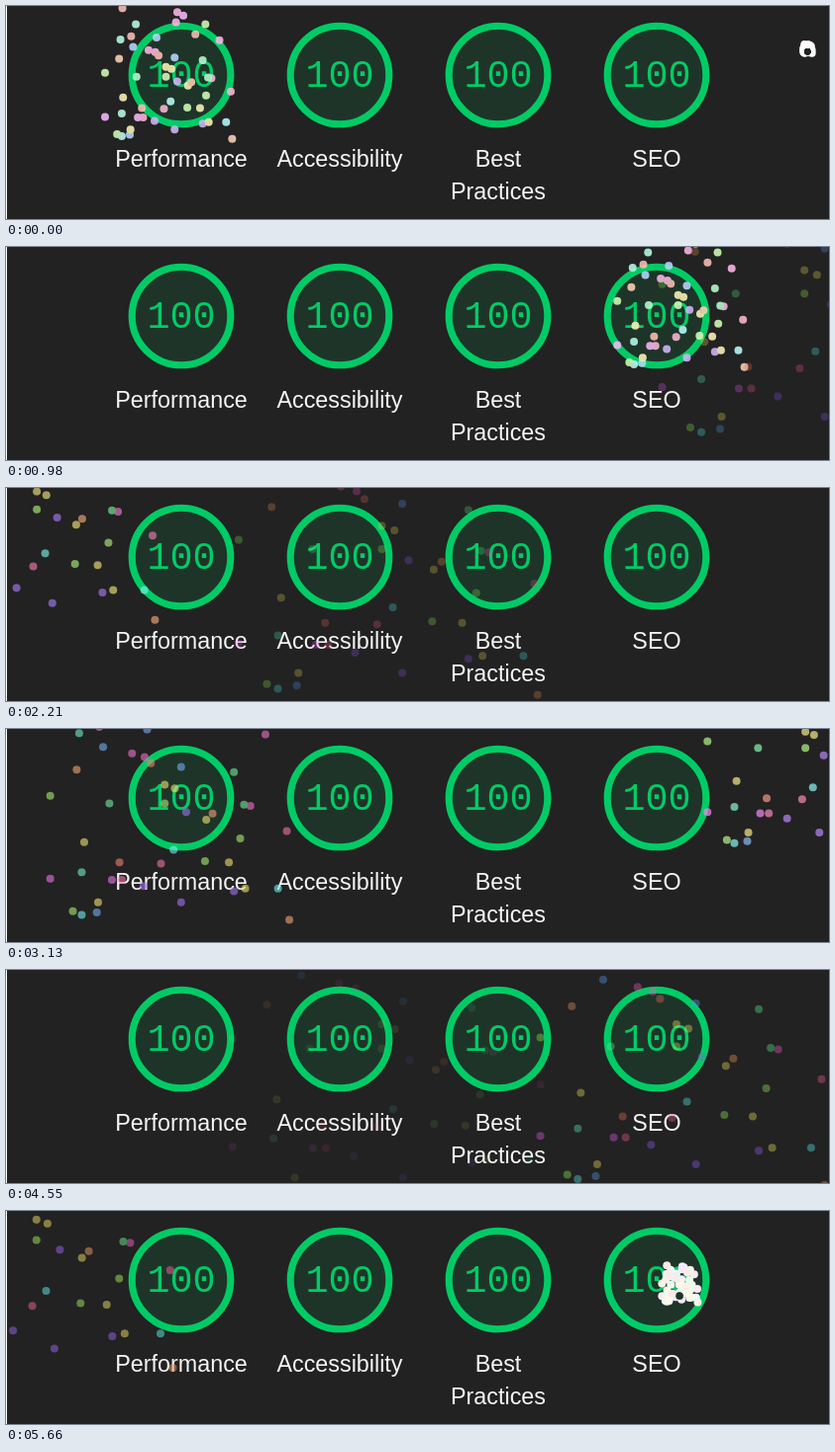
An HTML page that plays this animation: 831 px wide and 216 px high, repeating every 5720 ms.

```html
<!DOCTYPE html>
<html lang="en">
<head>
<meta charset="utf-8">
<title>Score fireworks</title>
<style>
  html, body { margin: 0; width: 100%; height: 100%; overflow: hidden; background: #222; }
  #stage { position: relative; width: 831px; height: 216px; overflow: hidden; }
  #stage::after { content: ""; position: absolute; inset: 0 auto 0 0; width: 1px; background: #fff; }
  svg { display: block; }
  circle { fill: rgba(0, 204, 102, .1); stroke: #0c6; stroke-width: 7.1; }
  text { text-anchor: middle; font: 23.33px "Liberation Sans", Arial, sans-serif; fill: #f5f5f5; }
  .score { font: 38.4px "Liberation Mono", monospace; fill: #0c6; }
  .burst { position: absolute; left: 0; top: 0; width: 8.33px; height: 8.33px; border-radius: 50%; }
</style>
</head>
<body>
<div id="stage">
  <svg id="gauges" width="831" height="216"></svg>
  <div class="burst"></div>
  <div class="burst"></div>
</div>
<script>
const LOOP = 5720, STEP = 65, FPS = 15, START = 6.27;
const SCALE = 5 / 3, PERCENT = 12.93;

const labels = [["Performance"], ["Accessibility"], ["Best", "Practices"], ["SEO"]];
document.getElementById("gauges").innerHTML = labels.map((lines, i) => {
  const x = 177 + 160 * i;
  return `<circle cx="${x}" cy="70" r="49.8"/><text class="score" x="${x}" y="82">100</text>` +
    lines.map((line, j) => `<text x="${x}" y="${163 + 33 * j}">${line}</text>`).join("");
}).join("");

// Where the sparks of each hue end up: x, y, x, y, ...
const sparks = {
  7: [42, -124, -38, -13, -13, -92, -67, -163, -54, -121],
  24: [36, -52, 97, 33, -72, -87],
  53: [-2, -75, 62, 8, -66, -29, 31, -47, -55, 19, 49, -13, 6, -72],
  96: [58, -32, 57, -139, -93, -66, 30, -14, -2, -60, -75, 26],
  140: [53, -85, 61, -59, -46, -60],
  162: [-70, -116, -47, -139, -68, -5],
  179: [5, -23, -68, 29, 88, 8],
  212: [-51, -105, -16, -119, -56, 27, 11, -89],
  263: [-19, 6, 15, -53, 53, 10, 11, 19],
  298: [24, -152, -44, 1, -93, 0],
  318: [-28, -100, 13, -142, 66, -58, 78, -115, 15, -157, -18, -97],
  335: [-36, 1, -5, -12, 95, -38]
};

// Successive burst places, in percent: left, top
const places = [[47, 4], [30, 7], [70, 6], [20, 3], [80, 3]];

// cubic-bezier(a, 0, b, 1)
function bezier(a, b, t) {
  let lo = 0, hi = 1;
  for (let i = 0; i < 30; i++) {
    const s = (lo + hi) / 2, r = 1 - s;
    if (3 * a * s * r * r + 3 * b * s * s * r + s * s * s < t) lo = s; else hi = s;
  }
  return lo * lo * (3 - 2 * lo);
}
const easeOut = t => bezier(0, .58, t);
const easeIn = t => bezier(.42, 1, t);

function sparkShadows(spread) {
  const k = SCALE * spread;
  return Object.entries(sparks).flatMap(([hue, ends]) => {
    const color = `color-mix(in srgb, #fff, hsl(${hue} 80.4% 60%) ${spread * 100}%)`;
    return ends.flatMap((x, i) => i % 2 ? [] : `${x * k}px ${(ends[i + 1] + .33) * k}px ${color}`);
  }).join();
}

function drawBurst(el, cycles) {
  const n = Math.floor(cycles), t = cycles - n;
  const [left, top] = places[n % places.length];
  const fall = easeIn(t);
  const x = 163 + PERCENT * (left - 30) - 4.17;
  const y = 46.3 + PERCENT * (top - 3) - 4.17 + 80 * SCALE * fall;
  el.style.transform = `translate(${x}px, ${y}px)`;
  el.style.opacity = 1 - fall;
  el.style.boxShadow = sparkShadows(easeOut(t));
}

const [first, second] = document.querySelectorAll(".burst");
function draw() {
  const ms = performance.now() % LOOP;
  const time = START + Math.floor((ms + 5) / STEP) % (LOOP / STEP) / FPS;
  drawBurst(first, time);
  drawBurst(second, (time - 1.25) / 1.25);
  requestAnimationFrame(draw);
}
draw();
</script>
</body>
</html>
```
